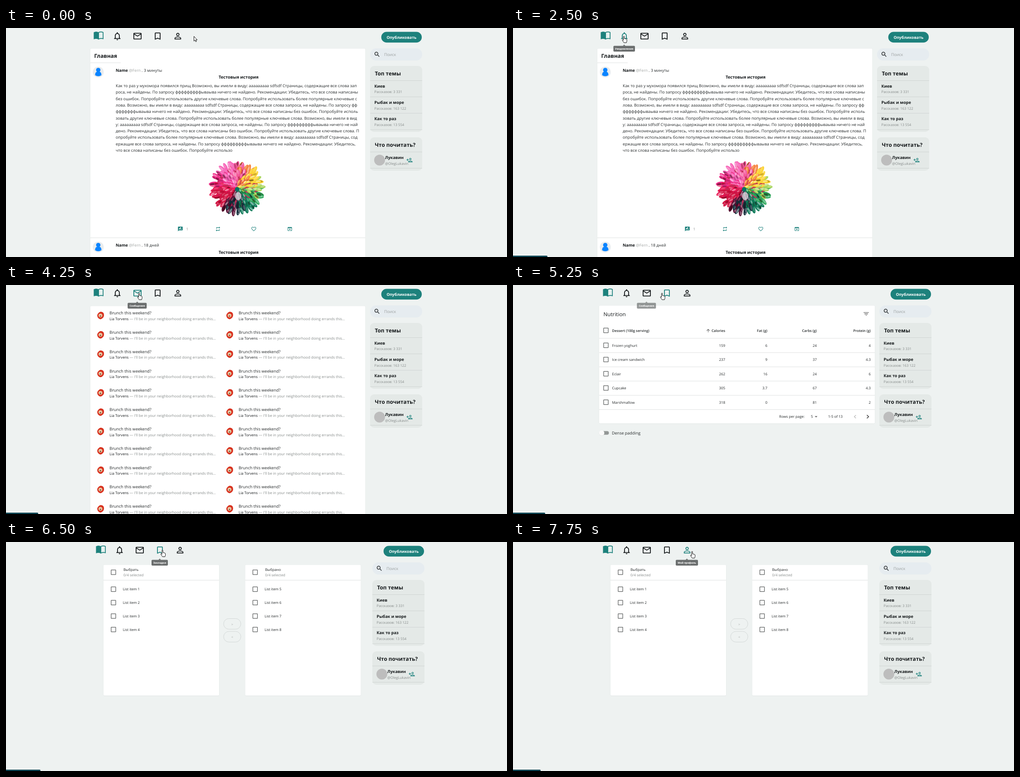
Animation of 1105 by 507 pixels, one loop 8000 ms. Source, as an HTML page:

```html
<!DOCTYPE html>
<html lang="ru">
<head>
<meta charset="utf-8">
<title>Лента</title>
<style>
html, body { margin: 0; width: 100%; height: 100%; overflow: hidden; background: #eef2f1; }
svg { display: block; width: 1105px; height: 507px; font-family: "Open Sans", "Noto Sans", sans-serif; text-rendering: geometricPrecision; }
</style>
</head>
<body>
<svg id="stage" viewBox="0 0 1105 507"></svg>
<script>
const TEAL = '#1d817c', INK = '#14181a', TEXT = '#25292a', GRAY = '#858a89', LINE = '#dfe2e1';
const LOOP = 8000;

const ICON = {
  bell: 'M12 22c1.1 0 2-.9 2-2h-4c0 1.1.9 2 2 2zm6-6v-5c0-3.07-1.63-5.64-4.5-6.32V4c0-.83-.67-1.5-1.5-1.5s-1.5.67-1.5 1.5v.68C7.64 5.36 6 7.92 6 11v5l-2 2v1h16v-1l-2-2zm-2 1H8v-6c0-2.48 1.51-4.5 4-4.5s4 2.02 4 4.5v6z',
  mail: 'M22 6c0-1.1-.9-2-2-2H4c-1.1 0-2 .9-2 2v12c0 1.1.9 2 2 2h16c1.1 0 2-.9 2-2V6zm-2 0l-8 5-8-5h16zm0 12H4V8l8 5 8-5v10z',
  mark: 'M17 3H7c-1.1 0-2 .9-2 2v16l7-3 7 3V5c0-1.1-.9-2-2-2zm0 15l-5-2.18L7 18V5h10v13z',
  person: 'M12 5.9c1.16 0 2.1.94 2.1 2.1s-.94 2.1-2.1 2.1S9.9 9.16 9.9 8s.94-2.1 2.1-2.1m0 9c2.97 0 6.1 1.46 6.1 2.1v1.1H5.9V17c0-.64 3.13-2.1 6.1-2.1M12 4C9.79 4 8 5.79 8 8s1.79 4 4 4 4-1.79 4-4-1.79-4-4-4zm0 9c-2.67 0-8 1.34-8 4v3h16v-3c0-2.66-5.33-4-8-4z',
  search: 'M15.5 14h-.79l-.28-.27C15.41 12.59 16 11.11 16 9.5 16 5.91 13.09 3 9.5 3S3 5.91 3 9.5 5.91 16 9.5 16c1.61 0 3.09-.59 4.23-1.57l.27.28v.79l5 4.99L20.49 19l-4.99-5zm-6 0C7.01 14 5 11.99 5 9.5S7.01 5 9.5 5 14 7.01 14 9.5 11.99 14 9.5 14z',
  add: 'M15 12c2.21 0 4-1.79 4-4s-1.79-4-4-4-4 1.79-4 4 1.79 4 4 4zm0-6c1.1 0 2 .9 2 2s-.9 2-2 2-2-.9-2-2 .9-2 2-2zm0 8c-2.67 0-8 1.34-8 4v2h16v-2c0-2.66-5.33-4-8-4zm-6 4c.22-.72 3.31-2 6-2 2.7 0 5.8 1.29 6 2H9zM6 15v-3h3v-2H6V7H4v3H1v2h3v3z',
  comment: 'M20 2H4c-1.1 0-1.99.9-1.99 2L2 22l4-4h14c1.1 0 2-.9 2-2V4c0-1.1-.9-2-2-2zM6 14v-2.47l6.88-6.88c.2-.2.51-.2.71 0l1.77 1.77c.2.2.2.51 0 .71L8.47 14H6zm12 0h-7.5l2-2H18v2z',
  repeat: 'M7 7h10v3l4-4-4-4v3H5v6h2V7zm10 10H7v-3l-4 4 4 4v-3h12v-6h-2v4z',
  heart: 'M16.5 3c-1.74 0-3.41.81-4.5 2.09C10.91 3.81 9.24 3 7.5 3 4.42 3 2 5.42 2 8.5c0 3.78 3.4 6.86 8.55 11.54L12 21.35l1.45-1.32C18.6 15.36 22 12.28 22 8.5 22 5.42 19.58 3 16.5 3zm-4.4 15.55l-.1.1-.1-.1C7.14 14.24 4 11.39 4 8.5 4 6.5 5.5 5 7.5 5c1.54 0 3.04.99 3.57 2.36h1.87C13.46 5.99 14.96 5 16.5 5c2 0 3.5 1.5 3.5 3.5 0 2.89-3.14 5.74-7.9 10.05z',
  share: 'M19 4H5c-1.11 0-2 .9-2 2v12c0 1.1.89 2 2 2h4v-2H5V8h14v10h-4v2h4c1.1 0 2-.9 2-2V6c0-1.1-.89-2-2-2zm-7 6l-4 4h3v6h2v-6h3l-4-4z',
  box: 'M19 5v14H5V5h14m0-2H5c-1.1 0-2 .9-2 2v14c0 1.1.9 2 2 2h14c1.1 0 2-.9 2-2V5c0-1.1-.9-2-2-2z',
  filter: 'M10 18h4v-2h-4v2zM3 6v2h18V6H3zm3 7h12v-2H6v2z',
  up: 'M4 12l1.41 1.41L11 7.83V20h2V7.83l5.58 5.59L20 12l-8-8-8 8z',
  drop: 'M7 10l5 5 5-5z',
  prev: 'M15.41 16.59L10.83 12l4.58-4.59L14 6l-6 6 6 6 1.41-1.41z',
  next: 'M8.59 16.59L13.17 12 8.59 7.41 10 6l6 6-6 6-1.41-1.41z'
};

function el(parent, tag, attrs, str) {
  const n = document.createElementNS('http://www.w3.org/2000/svg', tag);
  for (const k in attrs) n.setAttribute(k, attrs[k]);
  if (str !== undefined) n.textContent = str;
  return parent.appendChild(n);
}
const group = (p, attrs) => el(p, 'g', attrs);
const rect = (p, x, y, width, height, fill, rx = 0, more) => el(p, 'rect', { x, y, width, height, fill, rx, ...more });
const disc = (p, cx, cy, r, fill) => el(p, 'circle', { cx, cy, r, fill });
const path = (p, d, fill, more) => el(p, 'path', { d, fill, ...more });
const rule = (p, x, y, w, fill = LINE) => rect(p, x, y - .5, w, 1, fill);
const icon = (p, name, x, y, s, fill) =>
  path(p, ICON[name], fill, { transform: `translate(${x - 12 * s} ${y - 12 * s}) scale(${s})` });
// y is the middle of the lower-case letters
const text = (p, x, y, str, size, fill = TEXT, weight = 400, anchor = 'start') =>
  el(p, 'text', { x, y: y + size * .36, 'font-size': size, 'font-weight': weight, fill, 'text-anchor': anchor, 'xml:space': 'preserve' }, str);
const card = (p, x, y, w, h) => {
  rect(p, x - .5, y - .5, w + 1, h + 1.5, '#e2e7e6', 3);
  rect(p, x, y, w, h, '#fff', 2);
};

const stage = document.getElementById('stage');
rect(stage, 0, 0, 1105, 507, '#eef2f1');

/* ---- feed ---- */
const BODY = [
  'Как то раз у мухомора появился прищ Возможно, вы имели в виду: ааааааааа sdfsdf Страницы, содержащие все слова зап',
  'роса, не найдены. По запросу фффффффффываыва ничего не найдено. Рекомендации: Убедитесь, что все слова написаны',
  'без ошибок. Попробуйте использовать другие ключевые слова. Попробуйте использовать более популярные ключевые с',
  'лова. Возможно, вы имели в виду: ааааааааа sdfsdf Страницы, содержащие все слова запроса, не найдены. По запросу фф',
  'фффффффываыва ничего не найдено. Рекомендации: Убедитесь, что все слова написаны без ошибок. Попробуйте исполь',
  'зовать другие ключевые слова. Попробуйте использовать более популярные ключевые слова. Возможно, вы имели в вид',
  'у: ааааааааа sdfsdf Страницы, содержащие все слова запроса, не найдены. По запросу фффффффффываыва ничего не най',
  'дено. Рекомендации: Убедитесь, что все слова написаны без ошибок. Попробуйте использовать другие ключевые слова. П',
  'опробуйте использовать более популярные ключевые слова. Возможно, вы имели в виду: ааааааааа sdfsdf Страницы, сод',
  'ержащие все слова запроса, не найдены. По запросу фффффффффываыва ничего не найдено. Рекомендации: Убедитесь,',
  'что все слова написаны без ошибок. Попробуйте использо'
];

function postHead(p, y, age) {
  disc(p, 203.5, y + 4, 12, '#e9ecee');
  disc(p, 203.5, y - .5, 4.8, '#0a84ff');
  path(p, `M196.5 ${y + 11}q0-7 4-7.5h6q4 .5 4 7.5q-7 4.500-14 0z`, '#0a84ff');
  text(p, 242, y, 'Name', 9, INK, 700);
  text(p, 271, y, '@Fern', 8.7, '#a0a4a3');
  text(p, 299, y, '.', 8.8);
  text(p, 304, y, age, 8.8);
  text(p, 513, y + 15.5, 'Тестовыя история', 9.3, INK, 700, 'middle');
}

function flower(p, cx, cy) {
  // clockwise from the right
  const tones = ['#a9d65c', '#2ba85a', '#0c7a58', '#14303c', '#5a0e33', '#d0103f',
    '#ea1a56', '#f2308c', '#f765b8', '#f4589a', '#f5803a', '#fbd436'];
  let seed = 7;
  const rnd = () => (seed = seed * 16807 % 2147483647) / 2147483647;
  disc(p, cx, cy, 46, '#c03058');
  for (let ring = 0; ring < 8; ring++) {
    const r = 51 - ring * 6.5, n = 38 - ring * 4;
    for (let i = 0; i < n; i++) {
      const deg = (i + rnd() * .8) / n * 360;
      const tone = Math.floor(deg / 30 + rnd() * 1.2 + 11.9) % 12;
      const at = `translate(${cx} ${cy}) rotate(${deg}) translate(${r + rnd() * 5 - 2} 0) rotate(${rnd() * 40 - 20})`;
      const len = 8.5 + rnd() * 2 - ring * .5;
      el(p, 'ellipse', { rx: len, ry: len * .4, fill: tones[tone], transform: at });
      el(p, 'ellipse', { rx: len * .6, ry: len * .22, cx: 2, cy: -1, fill: rnd() < .7 ? '#fff' : '#200', opacity: .1 + rnd() * .4, transform: at });
    }
  }
  el(p, 'ellipse', { cx: cx + 2, cy: cy + 18, rx: 7, ry: 9, fill: '#fbe6ee', opacity: .7 });
  disc(p, cx, cy + 3, 5, '#0c6e62');
}

const feed = group(stage);
card(feed, 186, 45.5, 606.5, 470);
text(feed, 194.5, 62, 'Главная', 11.9, INK, 700);
rule(feed, 186, 77, 67);
postHead(feed, 93.5, '3 минуты');
BODY.forEach((s, i) => text(feed, 242, 128 + i * 14.27, s, 8.9));
flower(feed, 510, 354);
[['comment', 384.5], ['repeat', 467.5], ['heart', 546.5], ['share', 626]].forEach(([n, x]) => icon(feed, n, x, 445, .52, TEAL));
text(feed, 397.5, 445, '1', 8, GRAY);
rule(feed, 186, 464.5, 606.5);
postHead(feed, 481, '18 дней');

/* ---- notifications ---- */
const list = group(stage);
card(list, 186, 46.5, 606.5, 470);
for (let i = 0; i < 22; i++) {
  const x = i % 2 ? 513 : 228.3, y = 62 + (i >> 1) * 42.8;
  path(list, `M${x - 21} ${y - 2.5}q5-1 8 3q2 5-.5 9q-4 5-8 4q-6-3-5.500-9q1-4 6-7z`, '#d8321f');
  el(list, 'ellipse', { cx: x - 20, cy: y + 5.5, rx: 4.2, ry: 4, fill: '#e9c9a6' });
  el(list, 'ellipse', { cx: x - 20, cy: y + 6.8, rx: 1.7, ry: 1.4, fill: '#7a4a35' });
  text(list, x, y, 'Brunch this weekend?', 9.05);
  const sub = text(list, x, y + 13, '', 8.05, GRAY);
  el(sub, 'tspan', { fill: INK }, 'Lia Torvens');
  el(sub, 'tspan', {}, ' — I\'ll be in your neighborhood doing errands this…');
}

/* ---- messages ---- */
const table = group(stage);
const COLS = [468, 561, 670, 789];
const ROWS = [
  ['Frozen yoghurt', 159, 6, 24, 4], ['Ice cream sandwich', 237, 9, 37, 4.3], ['Eclair', 262, 16, 24, 6],
  ['Cupcake', 305, 3.7, 67, 4.3], ['Marshmallow', 318, 0, 81, 2]
];
card(table, 190, 45.5, 608, 261);
text(table, 199.5, 65, 'Nutrition', 11.7, INK, 500);
icon(table, 'filter', 779, 64, .64, '#666');
icon(table, 'up', 430.5, 101, .46, '#555');
function row(y, cells, size, weight) {
  icon(table, 'box', 205, y - .5, .63, '#5c5f5f');
  cells.forEach((c, i) => i
    ? text(table, COLS[i - 1], y, c, size, TEXT, weight, 'end')
    : text(table, 218.5, y, c, size, TEXT, weight));
  rule(table, 190, y + (weight > 400 ? 17 : 15.7), 608);
}
row(101, ['Dessert (100g serving)', 'Calories', 'Fat (g)', 'Carbs (g)', 'Protein (g)'], 7.75, 600);
ROWS.forEach((r, i) => row(134 + i * 31.5, r, 7.9, 400));
text(table, 587, 291.5, 'Rows per page:', 7.9);
text(table, 657, 291.5, '5', 7.9);
icon(table, 'drop', 668.5, 291.5, .6, '#666');
text(table, 695, 291.5, '1-5 of 13', 7.9);
icon(table, 'prev', 754.5, 291.5, .66, '#b8b8b8');
icon(table, 'next', 782.5, 291.5, .72, '#333');
rect(table, 194, 323.5, 17.5, 8, '#939796', 4);
disc(table, 195.5, 328, 6, '#dde1e0');
disc(table, 195.5, 327.5, 5.8, '#fafafa');
text(table, 218, 328, 'Dense padding', 9);

/* ---- bookmarks ---- */
const transfer = group(stage);
[['Выбрать', 215, 1], ['Выбрано', 527.5, 5]].forEach(([title, x, first]) => {
  card(transfer, x, 50.5, 255, 289.5);
  icon(transfer, 'box', x + 22, 67, .63, '#5c5f5f');
  text(transfer, x + 44, 61.5, title, 7.9);
  text(transfer, x + 44, 73.5, '0/4 selected', 7.9, GRAY);
  rule(transfer, x, 84.5, 255);
  for (let i = 0; i < 4; i++) {
    const y = 104.5 + i * 29.75;
    icon(transfer, 'box', x + 22, y, .63, '#5c5f5f');
    text(transfer, x + 42.7, y, 'List item ' + (first + i), 7.8);
  }
});
['>', '<'].forEach((s, i) => {
  rect(transfer, 480, 169.5 + i * 28.5, 38, 23.5, 'none', 11.7, { stroke: '#d3d8d7' });
  text(transfer, 499, 182 + i * 28.5, s, 7, '#a0a4a3', 400, 'middle');
});

const pages = { feed, list, table, transfer };

/* ---- header and sidebar ---- */
const shell = group(stage);
path(shell, 'M193.500 9.500q5.500-3 10.700 0v16q-5-2.500-10.700-.5z', TEAL);
path(shell, 'M204.200 10q5-2.500 10-.2v14q-5-1.500-10 .7z', '#e6f1ef', { stroke: TEAL, 'stroke-width': 1.7 });
const nav = {};
['bell', 'mail', 'mark', 'person'].forEach((n, i) => nav[n] = icon(shell, n, 245.5 + i * 44.5, 18, .9, INK));

rect(shell, 827.7, 8.5, 89.3, 23.7, TEAL, 11.8);
text(shell, 872.3, 20.5, 'Опубликовать', 8.65, '#fff', 700, 'middle');

rect(shell, 803, 45, 115, 27, '#e6ecf0', 13.5);
icon(shell, 'search', 818.5, 58.5, .63, INK);
text(shell, 834, 58.5, 'Поиск', 8.9, '#9a9f9f');

function panel(y, h, title) {
  rect(shell, 803, y, 115, h, '#e4e9e7', 9);
  text(shell, 813.5, y + 16.5, title, 11.8, INK, 700);
}
const SEP = '#d0d5d3';
panel(84, 146, 'Топ темы');
rule(shell, 803, 116.5, 115, SEP);
[['Киев', '3 331'], ['Рыбак и море', '163 122'], ['Как то раз', '13 554']].forEach(([topic, count], i) => {
  const y = 128.5 + i * 36.3;
  text(shell, 812.5, y, topic, 9, INK, 700);
  text(shell, 812.5, y + 13, 'Рассказов: ' + count, 7.75, GRAY);
  rule(shell, 803, y + 24, 115, SEP);
});
panel(242, 74, 'Что почитать?');
rule(shell, 803, 274.5, 115, SEP);
rule(shell, 803, 310.5, 115, SEP);
disc(shell, 824, 292.5, 12, '#bdbdbd');
text(shell, 836, 287, 'Лукавин', 9, INK, 700);
text(shell, 836, 300, '@OlegLukavin', 7.75, GRAY);
icon(shell, 'add', 890, 292.5, .6, TEAL);

const tips = {};
[['book', 204, 35, 'Главная'], ['bell', 245.2, 47.5, 'Уведомления'], ['mail', 289.3, 42, 'Сообщения'],
 ['mark', 334, 36, 'Закладки'], ['person', 378.5, 49, 'Мой профиль']].forEach(([n, x, w, label]) => {
  const g = tips[n] = group(shell);
  path(g, `M${x - 3} 39.700l3-3 3 3z`, '#6b6e6e');
  rect(g, x - w / 2, 39.5, w, 12.7, '#6b6e6e', 2);
  text(g, x, 46, label, 5.6, '#fff', 700, 'middle');
});

/* ---- browser overlay and pointer ---- */
const bar = rect(stage, -4, 504, 0, 8, '#0d4654', 2);
const edge = { stroke: '#111', 'stroke-width': 1, 'stroke-linejoin': 'round' };
const arrow = path(stage, 'M0 0v10.500l2.400-2.200 1.700 3.700 1.600-.8-1.600-3.500h3.200z', '#fff', edge);
const hand = path(stage, 'M3 1.500q1-1.300 2.100 0v4.800l4 1q1.500.4 1.500 2v3l-1 3.300h-5.400l-3.500-5.200q-.6-1.600.9-1.500l1.400 1.400z', '#fff', edge);

// time, pointer x, y, lit icon, tooltip, its opacity, bar width, page
const STEPS = [
  [0, 414.5, 18.5, '', '', 0, 0, 'feed'],
  [250, 285, 27.5, 'mail', '', 0, 0, 'feed'],
  [500, 216.5, 20, 'bell', 'bell', .8, 0, 'feed'],
  [750, 208.5, 17, 'book', 'book', 1, 0, 'feed'],
  [1000, 208.5, 17, 'book', 'book', 1, 58, 'feed'],
  [1750, 209.5, 17, 'book', 'book', 1, 58, 'feed'],
  [2000, 241, 24, 'bell', 'book', 1, 58, 'feed'],
  [2250, 242, 18, 'bell', 'bell', .5, 76, 'feed'],
  [2500, 240.5, 17, 'bell', 'bell', 1, 76, 'feed'],
  [3250, 240.5, 17, 'bell', 'bell', 1, 76, 'list'],
  [3750, 291.5, 17, 'mail', 'bell', 1, 71, 'list'],
  [4000, 289.5, 17, 'mail', '', 0, 71, 'list'],
  [4250, 289.5, 17, 'mail', 'mail', 1, 71, 'list'],
  [5250, 324.5, 17, 'mark', 'mail', .7, 71, 'table'],
  [5500, 341, 17, 'mark', 'mark', .5, 76, 'table'],
  [5750, 341, 17, 'mark', 'mark', 1, 76, 'table'],
  [6500, 341, 17, 'mark', 'mark', 1, 76, 'transfer'],
  [7000, 421.5, 20, 'person', 'mark', 1, 61, 'transfer'],
  [7250, 391, 20, 'person', '', 0, 61, 'transfer'],
  [7750, 391, 20, 'person', 'person', 1, 61, 'transfer']
];

const show = (n, on) => n.setAttribute('visibility', on ? 'visible' : 'hidden');
let last;
function render(step) {
  const [at, x, y, lit, tip, alpha, width, page] = step;
  const wide = page === 'table' || page === 'transfer'; // no scrollbar
  for (const k in pages) show(pages[k], k === page);
  for (const k in nav) nav[k].setAttribute('fill', k === lit ? TEAL : INK);
  for (const k in tips) tips[k].setAttribute('opacity', k === tip ? alpha : 0);
  shell.setAttribute('transform', `translate(${wide ? 5 : 0} 0)`);
  show(bar, width > 0);
  bar.setAttribute('width', width + 4);
  show(arrow, at === 0);
  show(hand, at > 0);
  for (const c of [arrow, hand]) c.setAttribute('transform', `translate(${x} ${y})`);
}
const start = performance.now();
function tick() {
  const t = (performance.now() - start) % LOOP;
  const step = STEPS.findLast(s => s[0] <= t);
  if (step !== last) render(last = step);
  requestAnimationFrame(tick);
}
tick();
</script>
</body>
</html>
```
